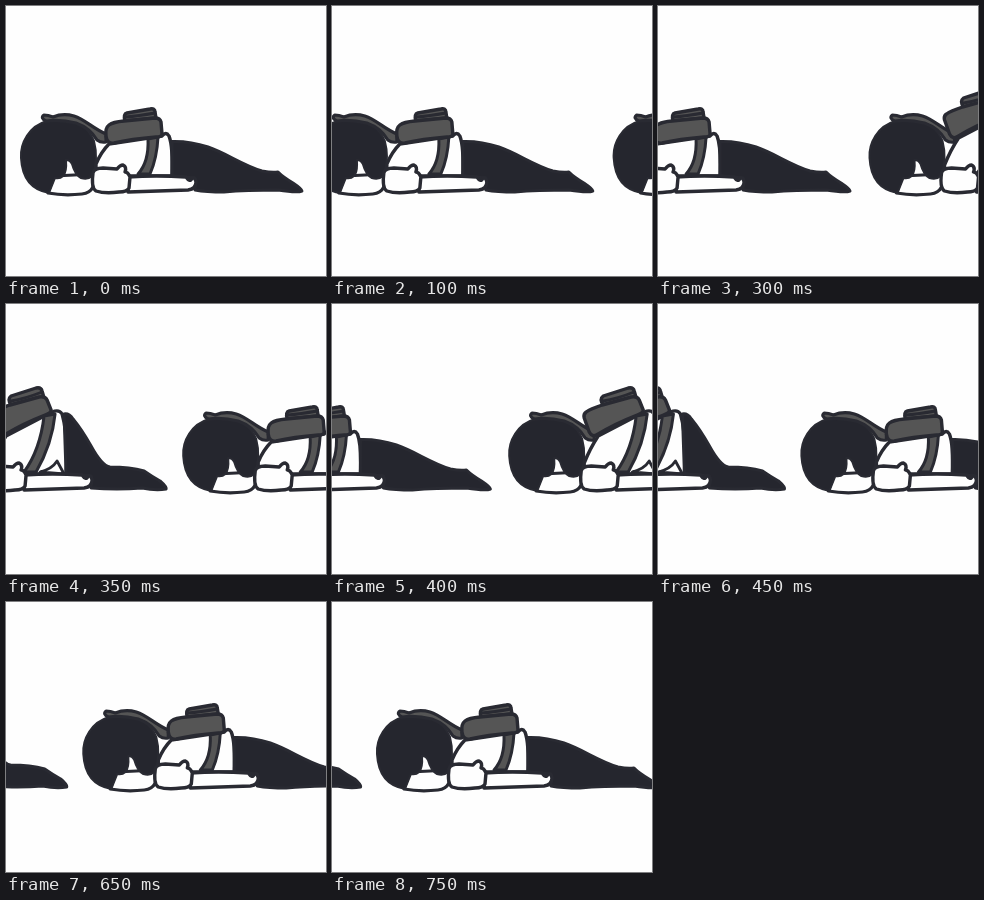
Write an HTML page with a canvas that moves like this. It is 320 px wide and 270 px high and loops after 0.8 s.

```html
<!DOCTYPE html>
<html lang="en">
<head>
<meta charset="utf-8">
<title>Inchworm crawl</title>
<style>
  html, body { margin: 0; width: 100%; height: 100%; overflow: hidden; background: #fefefe; }
  canvas { display: block; width: 320px; height: 270px; }
</style>
</head>
<body>
<canvas id="stage" width="320" height="270"></canvas>
<script>
const ctx = document.getElementById('stage').getContext('2d');
const WHITE = '#fefefe', INK = '#292a32', DARK = '#25262e', GRAY = '#555555';
const LOOP = 800, HOLD = 50;

const part = (fill, width, d) => ({ fill, width, path: new Path2D(d) });

// The head, hand and forearm stay put; the trunk, legs and backpack arch up.
const head = [
  part(WHITE, 3.2, 'M48 170L42 187Q58 190 76 188Q84 187 87 181L88 168Z'),
  part(DARK, 2, 'M41 115C23 120 14 137 15 152C16 171 25 184 43 187L49 172Q54 173 57 170Q61 166 60 154Q64 154 66 158Q69 169 75 172Q82 174 86 170Q93 154 88 135Q79 115 58 112Q48 112 41 115Z'),
  part(GRAY, 3.2, 'M40 115Q34 112 38 109Q42 109 47 111Q57 107 68 110C80 114 86 122 100 128L100 136Q95 137 91 134Q84 122 70 117Q54 113 40 115Z'),
];
const forearm = part(WHITE, 3.4, 'M122 171Q150 169 180 171Q184 177 186 172Q189 171 190 176Q190 183 182 184L122 186Z');
const hand = part(WHITE, 3.4, 'M87 167Q88 162 97 162L111 163Q114 159 117 159Q121 161 119 166Q122 166 124 171L123 182Q121 186 113 186Q99 188 90 185Q85 182 87 167Z');

const flat = {
  trunk: [
    part(WHITE, 3.4, 'M90 158Q95 146 103 138L156 130Q160 125 163 130Q167 140 166 170L119 170L90 166Z'),
    part(GRAY, 3, 'M142 133Q143 156 132 168L144 168Q151 152 152 131Z'),
    part(DARK, 3, 'M166 135.5Q184 135 202 141C222 148 236 159 256 165Q266 167 272 166Q277 171 287 177Q296 183 296 185Q291 187 272 184Q240 184 218 186Q200 186 189 184L189 172L166 170Z'),
  ],
  pack: [
    part(GRAY, 3.4, 'M119 115Q117 108 121 107L144 103Q149 102 149 106L150 112Z'),
    part(GRAY, 2.8, 'M120 111Q132 110 149 107'),
    part(GRAY, 3.4, 'M103 119Q107 116 118 115L149 112Q154 112 155 116L156 128Q156 131 150 131Q125 133 108 137Q101 138 100 130Q99 122 103 119Z'),
  ],
};

const arched = {
  trunk: [
    part(WHITE, 3.4, 'M90 159Q96 144 104 132L150 108Q157 105 160 110Q166 130 164 170L119 170L90 166Z'),
    part(GRAY, 3, 'M142 112Q138 146 122 168L134 168Q150 140 153 110Z'),
    part(DARK, 3, 'M162 110Q167 109 171 115Q180 126 189 142Q200 162 208 163Q228 163 242 167Q249 172 258 177Q265 183 264 185Q254 187 240 184Q215 186 189 184L189 172L164 170Z'),
    part(WHITE, 2.8, 'M138 168Q150 165 155 157L162 170Z'),
  ],
  pack: [
    part(GRAY, 3.4, 'M109 101Q105 95 109 92L134 84Q139 83 140 87L142 94Z'),
    part(GRAY, 2.8, 'M109 97Q122 95 140 88'),
    part(GRAY, 3.4, 'M92 108Q96 105 108 101L137 93Q143 92 145 96L149 106Q149 109 143 111Q120 120 104 130Q98 134 95 128L90 114Q89 110 92 108Z'),
  ],
};

function drawCrawler(dx, pose) {
  ctx.save();
  ctx.translate(dx, 0);
  ctx.lineJoin = ctx.lineCap = 'round';
  ctx.strokeStyle = INK;
  for (const { fill, width, path } of [...pose.trunk, forearm, ...head, hand, ...pose.pack]) {
    ctx.fillStyle = fill;
    ctx.lineWidth = width;
    ctx.fill(path);
    ctx.stroke(path);
  }
  ctx.restore();
}

// The head reaches forward on every other beat; in between the feet catch up.
function draw(time) {
  const beat = Math.floor(time % LOOP / HOLD);
  const odd = beat % 2 === 1;
  const leadSteps = Math.floor(beat / 2);
  const nextSteps = Math.ceil(beat / 2);
  const slide = (steps, pace) => 0.252 * steps * steps - pace * steps;

  ctx.fillStyle = WHITE;
  ctx.fillRect(0, 0, 320, 270);
  drawCrawler(slide(leadSteps, 35.4), odd ? arched : flat);
  if (beat > 0) drawCrawler(302.5 + slide(nextSteps, 36.08), odd ? flat : arched);
}

const start = performance.now();
function tick() {
  draw(performance.now() - start);
  requestAnimationFrame(tick);
}
tick();
</script>
</body>
</html>
```
